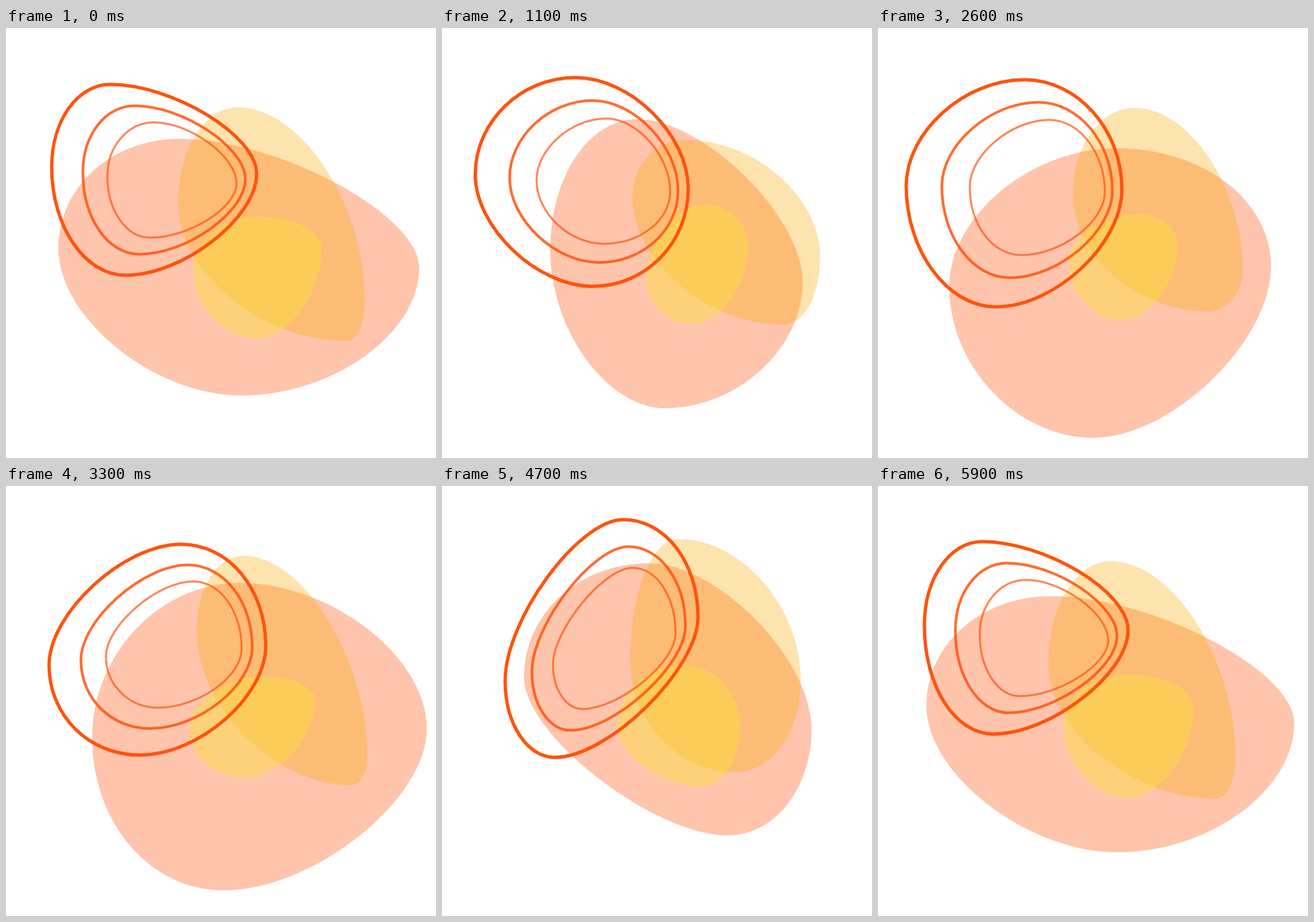
An HTML page with a canvas for the animation above (6 s loop, 640 px wide and 640 px high).

```html
<!DOCTYPE html>
<html lang="en">
<head>
<meta charset="utf-8">
<title>Blobs</title>
<style>
html, body { margin: 0; height: 100%; overflow: hidden; background: #fff; }
canvas { display: block; }
</style>
</head>
<body>
<canvas id="stage" width="640" height="640"></canvas>
<script>
const ctx = document.getElementById('stage').getContext('2d');
const LOOP = 6000, STEP = 100;
const times = [0, 500, 1700, 2600, 3900, 4700];

// Each pose is the leftmost, topmost, rightmost and lowest point of a blob.
const pink = [
  [78,328, 258,165, 615,357, 350,547],
  [137,322, 277,160, 557,390, 323,551],
  [152,350, 306,123, 548,352, 349,585],
  [106,385, 355,179, 585,355, 320,610],
  [148,345, 328,108, 633,365, 350,577],
  [122,285, 308,115, 550,362, 425,520]
];
const amber = [
  [256,262, 345,118, 534,405, 508,466],
  [282,242, 338,156, 550,377, 515,461],
  [276,268, 390,154, 565,322, 496,423],
  [290,248, 382,119, 543,360, 490,422],
  [277,205, 335,94, 537,405, 515,457],
  [280,260, 352,79, 534,290, 437,426]
];
const lemon = [
  [279,362, 375,281, 470,330, 374,462],
  [297,385, 403,278, 466,330, 375,441],
  [301,350, 372,253, 447,322, 370,447],
  [284,348, 388,277, 446,325, 362,435],
  [266,370, 370,281, 466,322, 362,438],
  [261,355, 358,267, 444,357, 385,447]
];
const outer = [
  [68,207, 155,84, 373,217, 178,368],
  [67,225, 185,84, 381,230, 224,369],
  [33,208, 203,65, 350,243, 200,403],
  [42,235, 218,77, 363,240, 175,415],
  [83,288, 288,84, 399,228, 212,390],
  [94,290, 270,50, 381,195, 168,404]
];

// The inner ring follows the outer one's swing, reduced, around its own rest shape.
const FOLLOW = .55;
const innerRest = [149,240, 256,135, 344,236, 223,325];
const outerRest = innerRest.map((_, n) => outer.reduce((sum, p) => sum + p[n], 0) / outer.length);

const at = (list, i) => list[(i + list.length) % list.length];
const mix = (a, b, k) => a.map((v, n) => v + (b[n] - v) * k);

// Slope at b for unevenly spaced values a, b, c.
const slope = (a, b, c, h0, h1) => ((b - a) / h0 * h1 + (c - b) / h1 * h0) / (h0 + h1);

// Smooth cyclic motion through the poses.
function pose(poses, t) {
  const i = times.findLastIndex(k => k <= t);
  const [h0, h, h2] = [i - 1, i, i + 1].map(j => (at(times, j + 1) - at(times, j) + LOOP) % LOOP);
  const [before, from, to, after] = [-1, 0, 1, 2].map(k => at(poses, i + k));
  const u = (t - times[i]) / h, v = 1 - u;
  return from.map((p, n) => {
    const q = to[n];
    const m0 = slope(before[n], p, q, h0, h) * h;
    const m1 = slope(p, q, after[n], h, h2) * h;
    return p * v * v * (1 + 2 * u) + m0 * u * v * v + q * u * u * (3 - 2 * u) - m1 * u * u * v;
  });
}

// Four quarter curves; quarters larger than average are flattened.
function outline(values, flatness) {
  const pts = [0, 2, 4, 6].map(n => values.slice(n, n + 2));
  const sizes = pts.map(([x, y], n) => {
    const [qx, qy] = at(pts, n + 1);
    return Math.abs(qx - x) + Math.abs(qy - y);
  });
  const mean = sizes.reduce((a, b) => a + b) / 4;
  ctx.beginPath();
  ctx.moveTo(...pts[0]);
  pts.forEach(([x, y], n) => {
    const [qx, qy] = at(pts, n + 1);
    const k = .56 - flatness * Math.max(0, sizes[n] / mean - .9);
    const dx = (qx - x) * k, dy = (qy - y) * k;
    if (n % 2) ctx.bezierCurveTo(x + dx, y, qx, qy - dy, qx, qy);
    else ctx.bezierCurveTo(x, y + dy, qx - dx, qy, qx, qy);
  });
  ctx.closePath();
}

function fill(values, flatness, color) {
  outline(values, flatness);
  ctx.fillStyle = color;
  ctx.fill();
}

function ring(values, width, alpha) {
  outline(values, .45);
  ctx.lineWidth = width;
  ctx.strokeStyle = `rgba(255, 83, 13, ${alpha})`;
  ctx.stroke();
}

function draw(now) {
  const t = Math.floor(now % LOOP / STEP) * STEP;
  ctx.clearRect(0, 0, 640, 640);
  fill(pose(pink, t), .5, '#ffc4ac');
  fill(pose(amber, t), .1, 'rgba(248, 171, 9, .333)');
  fill(pose(lemon, t), .25, 'rgba(250, 226, 50, .42)');
  const wide = pose(outer, t);
  const small = innerRest.map((v, n) => v + FOLLOW * (wide[n] - outerRest[n]));
  ring(small, 3, .7);
  ring(mix(wide, small, .56), 4, .85);
  ring(wide, 5, 1);
}

const start = performance.now();
function tick() {
  draw(performance.now() - start);
  requestAnimationFrame(tick);
}
tick();
</script>
</body>
</html>
```
